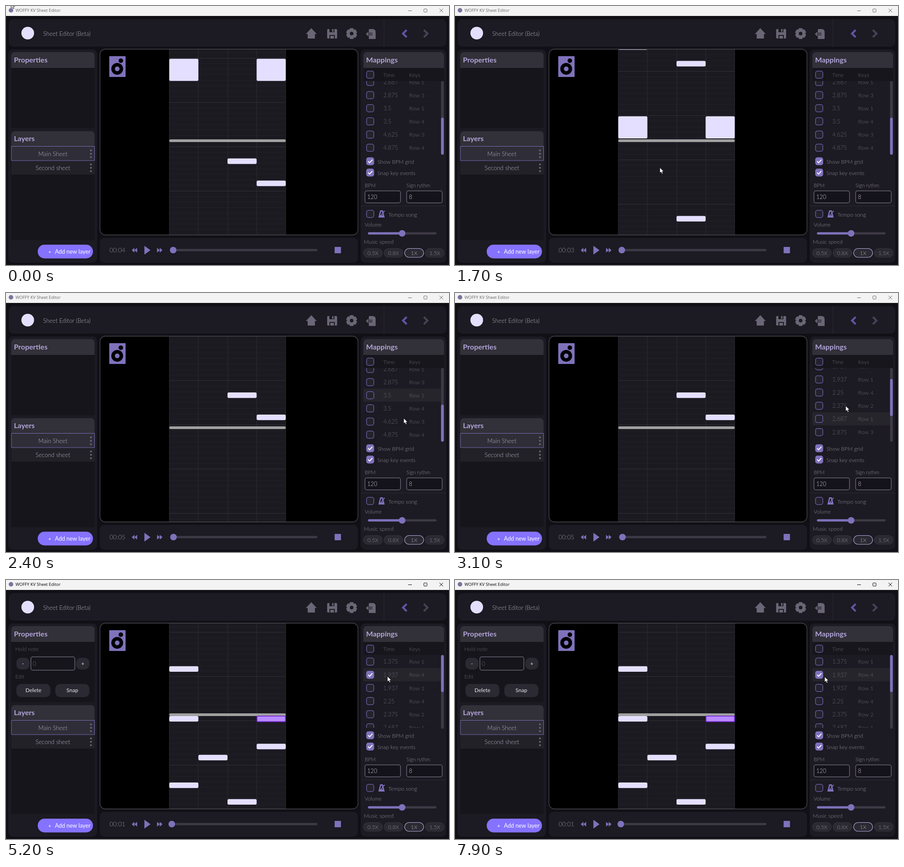
These frames come from a looping animation (978 px wide and 573 px high, 8000 ms). An HTML page with a canvas:

```html
<!DOCTYPE html>
<html lang="en">
<head>
<meta charset="utf-8">
<title>Sheet editor</title>
<style>
  html, body { margin: 0; width: 100%; height: 100%; overflow: hidden; background: #111016; }
  canvas { display: block; width: 100%; height: 100%; }
</style>
</head>
<body>
<canvas id="stage" width="978" height="573"></canvas>
<script>
const ctx = document.getElementById('stage').getContext('2d');
const LOOP = 8000, STEP = 100;
const TICKS_PER_SEC = 16, PX_PER_TICK = 12.25, PX_PER_SEC = TICKS_PER_SEC * PX_PER_TICK;
const JUDGE_Y = 298, LANE_X = 360.4, LANE_W = 64.3;
const LIST_TOP = 166, LIST_H = 161, ROW_H = 29.1, MAX_SCROLL = 158;
const ACTIVATE_AT = 4900, SELECT_AT = 5100, SELECTED = 1;

const C = {
  bg: '#111016', panel: '#1c1a22', head: '#323038', well: '#16151b', btn: '#2b2932', input: '#14121a',
  purple: '#7f72bb', frame: '#686474', icon: '#6a6675', track: '#3d3a47', note: '#e5dfff',
  white: '#ebe8f4', title: '#b1a5d9', text: '#b7b3c4', label: '#938f9e', dim: '#696673'
};

// Notes sit on a 1/16 s grid; the chord at tick 56 is held for four ticks.
const lanes = '14142131434';
const notes = [22, 31, 31, 36, 38, 43, 46, 56, 56, 74, 78].map((tick, i) => ({
  tick, lane: +lanes[i], length: tick === 56 ? 4 : 1,
  label: Math.floor(tick / TICKS_PER_SEC * 1000) / 1000
}));

// Stops of each moving part: time in ms, then its values; eased in between.
const cursorStops = [
  [0, 11, -8], [700, 538, 412], [1100, 453, 360], [1900, 452, 357], [2300, 912, 221], [2400, 878, 277],
  [3700, 850, 228], [3900, 811, 212], [4300, 811, 212], [4600, 842, 213], [5400, 842, 213],
  [6000, 613, 316], [6400, 545, 299], [6800, 650, 262], [7000, 527, 297], [7300, 705, 332],
  [7600, 862, 240], [7900, 816, 214]
];
const songStops = [[1100, 4.425], [1300, 3.855], [1700, 3.775], [2100, 5.023], [5000, 5.023], [5100, 1.922]];
const scrollStops = [[2400, MAX_SCROLL], [3500, 0]];

function glide(stops, t) {
  const i = stops.findIndex(stop => stop[0] > t);
  if (i <= 0) return stops.at(i).slice(1);
  const [from, ...a] = stops[i - 1], [to, ...b] = stops[i];
  const p = (t - from) / (to - from), eased = p * p * (3 - 2 * p);
  return a.map((v, n) => v + (b[n] - v) * eased);
}

function box(x, y, w, h, r = 0, fill, stroke, lw = 1.5) {
  ctx.beginPath();
  ctx.roundRect(x, y, w, h, r);
  if (fill) { ctx.fillStyle = fill; ctx.fill(); }
  if (stroke) { ctx.strokeStyle = stroke; ctx.lineWidth = lw; ctx.stroke(); }
}
function disc(x, y, r, fill) {
  ctx.beginPath();
  ctx.arc(x, y, r, 0, Math.PI * 2);
  ctx.fillStyle = fill;
  ctx.fill();
}
function trace(points) {
  ctx.beginPath();
  for (const [x, y] of points) ctx.lineTo(x, y);
}
function poly(points, fill) {
  trace(points);
  ctx.closePath();
  ctx.fillStyle = fill;
  ctx.fill();
}
function line(points, color, lw = 1) {
  trace(points);
  ctx.strokeStyle = color;
  ctx.lineWidth = lw;
  ctx.stroke();
}
// Arrowheads point along dx, centred on y.
const arrow = (x, y, dx, dy, fill) => poly([[x, y - dy], [x, y + dy], [x + dx, y]], fill);
const chevron = (x, y, dx, dy, color, lw) => line([[x - dx, y - dy], [x, y], [x - dx, y + dy]], color, lw);

function text(str, x, y, size, color, weight = 300, align = 'left', family = 'Lato') {
  ctx.font = `${weight} ${size}px ${family}, sans-serif`;
  ctx.textAlign = align;
  ctx.fillStyle = color;
  ctx.fillText(str, x, y);
}
function button(label, x, y, w, h) {
  box(x, y, w, h, 10, C.btn);
  text(label, x + w / 2, y + h / 2, 12, C.white, 400, 'center');
}
function checkbox(y, checked) {
  box(796, y - 8, 16, 16, 4, checked ? C.purple : '#24222b', checked ? C.purple : '#685ca0');
  if (checked) line([[799.5, y], [802.7, y + 3.4], [808.8, y - 3.2]], '#fff', 2);
}
function slider(x0, x1, y, x, passed) {
  box(x0, y - 2.5, x1 - x0, 5, 2.5, C.track);
  if (passed) box(x0, y - 2.5, x - x0, 5, 2.5, C.purple);
  disc(x, y, 7.3, C.purple);
}
function panelHead(label, x, y, w, h) {
  box(x, y, w, h, [8, 8, 0, 0], C.head);
  text(label, x + 6, y + h / 2 + 1, 16, C.title, 700);
}

function titleBar(active) {
  const ink = active ? '#000' : '#666';
  box(0, 0, 978, 22, 0, '#f3f3f3');
  disc(11, 9.5, 5, '#77749c');
  text('WOFFY KV Sheet Editor', 21, 11, 9.3, ink, 400, 'left', '"Open Sans"');
  line([[888, 10.5], [896, 10.5]], ink);
  box(922.5, 6.5, 7, 7, 1, null, ink, 1);
  for (const d of [-4, 4]) line([[961 - d, 6], [961 + d, 14]], ink);
}

function header() {
  box(6, 29, 966, 61, 10, C.panel);
  line([[834.5, 29], [834.5, 90]], '#2b2932');
  disc(48, 60, 14, C.note);
  text('Sheet Editor (Beta)', 82, 62, 13, C.text);

  poly([[674, 49], [686, 62], [662, 62]], C.icon);
  box(666, 61, 16, 11, 0, C.icon);

  box(709, 51, 22, 21, 2, C.icon);
  box(714, 51, 11, 7, 0, C.panel);
  box(720, 51, 3, 6, 0, C.icon);
  box(714, 64, 12, 8, 0, C.panel);
  box(716, 66, 8, 6, 0, C.icon);

  for (let i = 0; i < 6; i++) {
    ctx.save();
    ctx.translate(763, 61);
    ctx.rotate(i * Math.PI / 3);
    box(-4.5, -12, 9, 9, 2, C.icon);
    ctx.restore();
  }
  disc(763, 61, 10, C.icon);
  disc(763, 61, 4, C.panel);

  box(801, 51, 15, 22, [1, 6, 1, 1], C.icon);
  line([[796, 62], [809, 62]], C.panel, 5);
  line([[797, 62], [809, 62]], C.icon, 2);
  chevron(796, 62, -4, 4, C.icon, 2);

  chevron(876.5, 61, -8, 8, '#6255a5', 4.5);
  chevron(930.5, 61, 8, 8, '#464157', 4.5);
}

function noteProperties() {
  text('Hold note', 20.5, 153, 12, C.dim);
  button('-', 23, 172, 29, 26);
  box(55, 170, 97, 29.5, 4, C.well, C.frame);
  text('0', 59, 186, 13, C.dim);
  button('+', 155, 172, 29, 26);
  text('Edit', 20.5, 214, 12, C.dim);
  button('Delete', 23, 230, 75, 29);
  button('Snap', 109, 230, 75, 29);
}

function leftPanel(selected) {
  box(5, 96, 196, 472, 10, C.panel);
  panelHead('Properties', 11.5, 102, 184, 35);
  box(11.5, 137, 184, 133, 0, C.well);
  if (selected) noteProperties();
  panelHead('Layers', 11.5, 277, 184, 33);
  box(11.5, 310, 184, 208, 0, C.well);
  box(12, 310.5, 183.5, 31.5, 0, '#2f2d37', '#7d70bb', 1);
  box(12, 343, 184, 30, 0, '#222128');
  ['Main Sheet', 'Second sheet'].forEach((name, i) => {
    const y = 327 + i * 31;
    text(name, 103.5, y + 1, 13.2, C.text, 300, 'center');
    for (const d of [-7.5, 0, 7.5]) disc(187.5, y + d, 2.1, C.dim);
  });
  box(70, 528, 122, 30.5, 15, '#8572ff');
  text('+', 93, 544.5, 12, '#fff', 400);
  text('Add new layer', 108, 544, 12.5, '#fff', 400);
}

function speaker(x, y) {
  box(x, y, 36, 46, 1, C.purple);
  disc(x + 17.5, y + 28, 13, '#000');
  disc(x + 17.5, y + 28, 5.2, C.purple);
  disc(x + 25.5, y + 10, 5, '#000');
}

function sheet(songTime, selected) {
  const origin = JUDGE_Y - songTime * PX_PER_SEC;
  const right = LANE_X + 4 * LANE_W, top = 95.5, bottom = 506.5;
  ctx.save();
  box(207.5, top, 569.5, bottom - top, 12, '#000');
  ctx.clip();
  box(LANE_X, top, right - LANE_X, bottom - top, 0, '#1b1a21');
  for (let k = Math.ceil((top - origin) / PX_PER_TICK); origin + k * PX_PER_TICK < bottom + 3; k++) {
    const y = Math.round(origin + k * PX_PER_TICK - 2) + .5;
    line([[LANE_X, y], [right, y]], k % 8 ? '#222128' : '#323138');
  }
  for (let lane = 0; lane <= 4; lane++) {
    const x = Math.floor(LANE_X + lane * LANE_W) + .5;
    line([[x, top], [x, bottom]], '#2b2a31');
  }
  box(LANE_X, JUDGE_Y - 3, right - LANE_X, 6, 3, '#a0a0a0');
  notes.forEach(({ tick, lane, length }, i) => {
    const x = LANE_X + (lane - 1) * LANE_W, y = origin + tick * PX_PER_TICK, h = length * PX_PER_TICK;
    if (selected && i === SELECTED) box(x + .8, y, 63, h, 2, '#b98bff', '#7824dc', 1.8);
    else box(x, y, LANE_W, h, 3, C.note);
  });
  speaker(228, 111);
  ctx.restore();
  box(207.5, top, 569.5, bottom - top, 12, null, '#4a484e', 1.3);
}

function player(songTime) {
  const y = 540.2;
  box(207, 513, 570, 55, 10, C.panel);
  text('00:0' + Math.floor(songTime), 228.5, 541, 13.7, C.label);
  for (const d of [0, 6]) {
    arrow(283.5 + d, y, -6, 5.2, C.purple);
    arrow(333.5 + d, y, 6, 5.2, C.purple);
  }
  arrow(305.5, y, 13.5, 9.8, C.purple);
  slider(363, 687.5, 540, 363.7 + songTime * 1.2);
  box(725.5, 533, 14, 14, 0, C.purple);
}

function hoveredRow(t) {
  const [x, y] = glide(cursorStops, t);
  const inside = x > 789 && x < 960 && y > LIST_TOP && y < LIST_TOP + LIST_H;
  return inside ? Math.floor((y - LIST_TOP + glide(scrollStops, t)[0]) / ROW_H) : -1;
}

function mappings(t, selected) {
  const [scroll] = glide(scrollStops, t);
  const hovered = hoveredRow(t - STEP); // the highlight trails the pointer
  box(783, 96, 189, 472, 10, C.panel);
  panelHead('Mappings', 789, 102, 178, 35);
  box(789, 137, 178, 29, 0, '#17161c');
  checkbox(152);
  text('Time', 832.5, 153, 12, C.dim);
  text('Keys', 890, 153, 12, C.dim);

  ctx.save();
  ctx.beginPath();
  ctx.rect(789, LIST_TOP, 171, LIST_H);
  ctx.clip();
  notes.forEach(({ label, lane }, i) => {
    const y = LIST_TOP + (i + .5) * ROW_H - scroll;
    if (i === hovered) box(789, y - ROW_H / 2, 171, ROW_H, 0, '#26252c');
    line([[789, y + ROW_H / 2], [960, y + ROW_H / 2]], '#1f1d25');
    checkbox(y, selected && i === SELECTED);
    text(label, 833, y + 1, 12.7, C.dim);
    text('Row ' + lane, 890, y + 1, 12.4, C.dim);
  });
  ctx.restore();
  box(960.5, LIST_TOP, 6, 163, 3, C.track);
  box(960.5, LIST_TOP + scroll / MAX_SCROLL * 81, 6, 82, 3, C.purple);
}

function settings() {
  ['Show BPM grid', 'Snap key events'].forEach((option, i) => {
    checkbox(343.5 + i * 25, true);
    text(option, 820, 345 + i * 25, 12.1, C.label);
  });
  [['BPM', 120], ['Sign rythm', 8]].forEach(([name, value], i) => {
    const x = 792.5 + i * 92;
    text(name, x - .5, 398, 11.3, C.label);
    box(x, 409, 78.5, 26.5, 4, C.input, C.frame);
    text(value, x + 5, 423, 12.7, '#d0ccdc');
  });
  line([[783, 442.5], [972, 442.5]], '#2b2932');

  checkbox(460);
  poly([[826, 452], [832, 452], [836, 468], [822, 468]], C.purple);
  poly([[828, 455], [830, 455], [832, 463], [826, 463]], C.panel);
  line([[828, 463], [836, 453]], C.purple, 1.8);
  text('Tempo song', 844, 462.5, 12.2, C.label);
  text('Volume', 792, 484, 11.5, C.label);
  slider(799, 950.5, 503, 874.5, true);
  text('Music speed', 790, 522, 12.2, C.label);
  ['0.5X', '0.8X', '1X', '1.5X'].forEach((speed, i) => {
    const x = 810 + i * 45.5, on = speed === '1X';
    box(x - 21, 536.5, 42, 19.5, 10, C.btn, on ? '#bbb2e0' : '#34313c', 1.2);
    text(speed, x, 547, 12, on ? C.text : C.label, 300, 'center');
  });
}

function cursor(t) {
  ctx.save();
  ctx.translate(...glide(cursorStops, t));
  ctx.lineJoin = 'round';
  poly([[0, 0], [0, 12], [2.8, 9.6], [4.8, 14], [7, 13], [5, 8.8], [8.8, 8.8]], '#fff');
  ctx.strokeStyle = '#000';
  ctx.lineWidth = .8;
  ctx.stroke();
  ctx.restore();
}

function draw(t) {
  const [songTime] = glide(songStops, t), selected = t >= SELECT_AT;
  ctx.textBaseline = 'middle';
  box(0, 0, 978, 573, 0, C.bg);
  titleBar(t >= ACTIVATE_AT);
  header();
  leftPanel(selected);
  sheet(songTime, selected);
  player(songTime);
  mappings(t, selected);
  settings();
  cursor(t);
}

const start = performance.now();
function tick() {
  const t = (performance.now() - start) % LOOP;
  draw(Math.floor(t / STEP) * STEP);
  requestAnimationFrame(tick);
}
tick();
</script>
</body>
</html>
```
